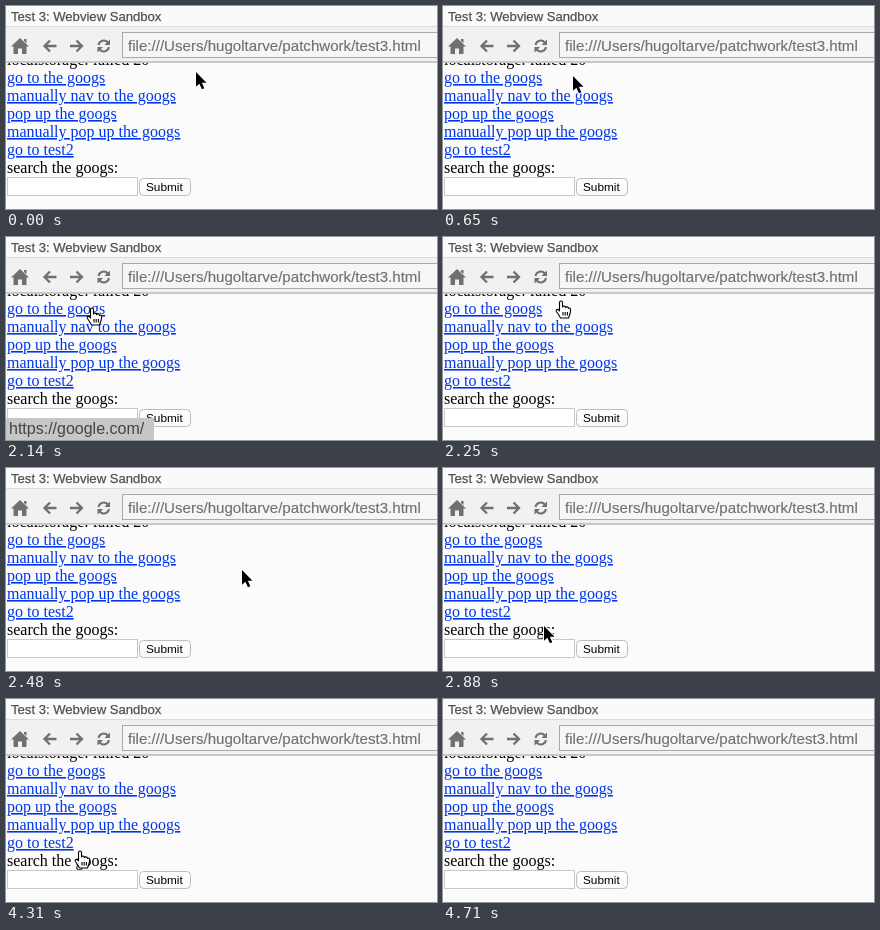
Write an HTML page that moves like this. It is 431 px wide and 203 px high and loops after 5.07 s.

```html
<!DOCTYPE html>
<html lang="en">
<head>
<meta charset="utf-8">
<title>Webview Sandbox</title>
<style>
  html, body { margin: 0; width: 100%; height: 100%; overflow: hidden; background: #fbfbfb; }
  svg { display: block; width: 431px; height: 203px; }
  .ui { font-family: "Liberation Sans", Arial, sans-serif; }
  .page { font: 16px "Liberation Serif", Times, serif; }
  .link { fill: #0036ea; text-decoration: underline; }
  .icon { fill: none; stroke: #707070; stroke-width: 2.3; }
</style>
</head>
<body>
<svg viewBox="0 0 431 203">
  <defs>
    <linearGradient id="face" x2="0" y2="1">
      <stop stop-color="#fff"/><stop offset="1" stop-color="#f8f8f8"/>
    </linearGradient>
    <path id="back" d="M50.5 40H39M44 34.5 38.5 40 44 45.5"/>
    <path id="turn" d="M92.5 39A5.3 5.3 0 0 1 101.8 36.5"/>
  </defs>
  <rect width="431" height="203" fill="#fbfbfb"/>

  <g class="page" id="page"><text x="1" y="59">localstorage: failed 20</text></g>
  <rect x="1.5" y="171.5" width="130" height="18" fill="#fff" stroke="#c8c8c8"/>
  <rect x="133.5" y="172.5" width="51" height="17" rx="4" fill="url(#face)" stroke="#bdbdbd"/>
  <text class="ui" x="140" y="185" font-size="11.8">Submit</text>

  <rect width="431" height="57" fill="#f1f1f1"/>
  <rect width="431" height="20" fill="#fafafa"/>
  <path d="M0 20.5H431" stroke="#dcdcdc"/>
  <path d="M0 56H431" stroke="#c8c8c8" stroke-width="2"/>
  <text class="ui" x="5" y="14.5" font-size="13.1" fill="#505050" stroke="#505050" stroke-width=".25">Test 3: Webview Sandbox</text>
  <path fill="#707070" d="M14 32 23 40.5H20.5V48H16V42.5H12V48H7.500V40.500H5ZM18 33H20.500V37L18 35Z"/>
  <g class="icon">
    <use href="#back"/>
    <use href="#back" transform="matrix(-1 0 0 1 114.5 0)"/>
    <g stroke-width="2">
      <use href="#turn"/>
      <use href="#turn" transform="rotate(180 97.75 40)"/>
    </g>
    <path fill="#707070" stroke="none" d="M104 33.5V39H98.5ZM91.5 46.5V41H97Z"/>
  </g>
  <rect x="116.5" y="26.5" width="320" height="25" fill="#f6f6f6" stroke="#a8a8a8"/>
  <text class="ui" x="122" y="45" font-size="15.1" fill="#707070" stroke="#707070" stroke-width=".15">file:///Users/hugoltarve/patchwork/test3.html</text>

  <g id="status">
    <rect y="181" height="22" fill="#c6c6c6"/>
    <text class="ui" x="3" y="197" font-size="16" fill="#444"></text>
  </g>

  <g id="cursor" stroke-linejoin="round">
    <path id="arrow" stroke="#fff" stroke-width="2" paint-order="stroke" d="M0 0V14.8L3.4 11.7 5.9 17.3 8.3 16.2 5.9 10.8H10.5Z"/>
    <path id="hand" fill="#fff" stroke="#000" stroke-width="1.1" d="M-1.5 10V1.5Q-1.5 0 0 0T1.5 1.5V6Q2 4.8 3.2 5.1 4.4 5.3 4.5 6.6 5 5.6 6.2 5.9 7.3 6.2 7.4 7.4 8 6.7 9 7.2 9.8 7.7 9.6 9.5L9.1 12.5 7.5 17H-.5L-2.5 13.5-4.6 10.5Q-5.3 9.1-4.2 8.5-3.2 8.1-2.3 9ZM2 11V14.5M4.2 11V14.5M6.4 11V14.5"/>
  </g>
</svg>
<script>
const LOOP = 5070;
const $ = id => document.getElementById(id);

const lines = ["go to the googs", "manually nav to the googs", "pop up the googs",
  "manually pop up the googs", "go to test2", "search the googs:"];
lines.forEach((line, i) => {
  const text = document.createElementNS("http://www.w3.org/2000/svg", "text");
  text.setAttribute("x", 1);
  text.setAttribute("y", 77 + 18 * i);
  if (i < 5) text.setAttribute("class", "link");
  text.textContent = line;
  $("page").append(text);
});

// Links that open a status bar when hovered.
const targets = [
  { row: 0, right: 100, width: 148, url: "https://google.com/" },
  { row: 4, right: 69, width: 323, url: "file:///Users/hugoltarve/patchwork/test2.html" }
];
const targetAt = (x, y) =>
  targets.find(t => x < t.right && Math.floor((y - 63) / 18) === t.row);

const linear = u => u;
const easeIn = u => u ** 1.5;
const easeOut = u => 1 - (1 - u) ** 2;
const easeInOut = u => u * u * (3 - 2 * u);

// Each stroke follows a Bezier curve in evenly timed steps.
const strokes = [
  { start: 0, curve: [[190, 66]] },
  { start: 360, end: 880, steps: 10, ease: easeInOut, curve: [[188, 67], [140, 68], [86, 73]] },
  { start: 940, curve: [[82, 73]] },
  { start: 2140, end: 2650, steps: 10, ease: linear, curve: [[86, 71], [180, 40], [293, 103], [212, 150]] },
  { start: 2710, end: 3110, steps: 8, ease: easeOut, curve: [[195, 156], [125, 165], [56, 152]] },
  { start: 4310, end: 4710, steps: 8, ease: easeIn, curve: [[74, 152], [250, 150], [470, 225]] }
];

const mix = (a, b, u) => a + (b - a) * u;

function pointOn(curve, u) {
  if (curve.length === 1) return curve[0];
  const inner = curve.slice(1).map(([x, y], i) => [mix(curve[i][0], x, u), mix(curve[i][1], y, u)]);
  return pointOn(inner, u);
}

const poses = strokes.flatMap(({ start, end = start, steps = 1, ease = linear, curve }) =>
  Array.from({ length: steps }, (_, i) => {
    const u = steps > 1 ? i / (steps - 1) : 0;
    const [x, y] = pointOn(curve, ease(u));
    return { time: mix(start, end, u), x, y, target: targetAt(x, y) };
  }));
// The pointing hand lingers for one pose after leaving a link.
poses.forEach((pose, i) => pose.hand = Boolean(pose.target || poses[i - 1]?.target));

const show = (id, visible) => $(id).setAttribute("visibility", visible ? "visible" : "hidden");

function draw() {
  const time = performance.now() % LOOP;
  const { x, y, hand, target } = poses.findLast(p => p.time <= time + 0.5);
  $("cursor").setAttribute("transform", `translate(${Math.round(x)} ${Math.round(y)})`);
  show("hand", hand);
  show("arrow", !hand);
  show("status", target);
  if (target) {
    $("status").querySelector("rect").setAttribute("width", target.width);
    $("status").querySelector("text").textContent = target.url;
  }
  requestAnimationFrame(draw);
}
draw();
</script>
</body>
</html>
```
